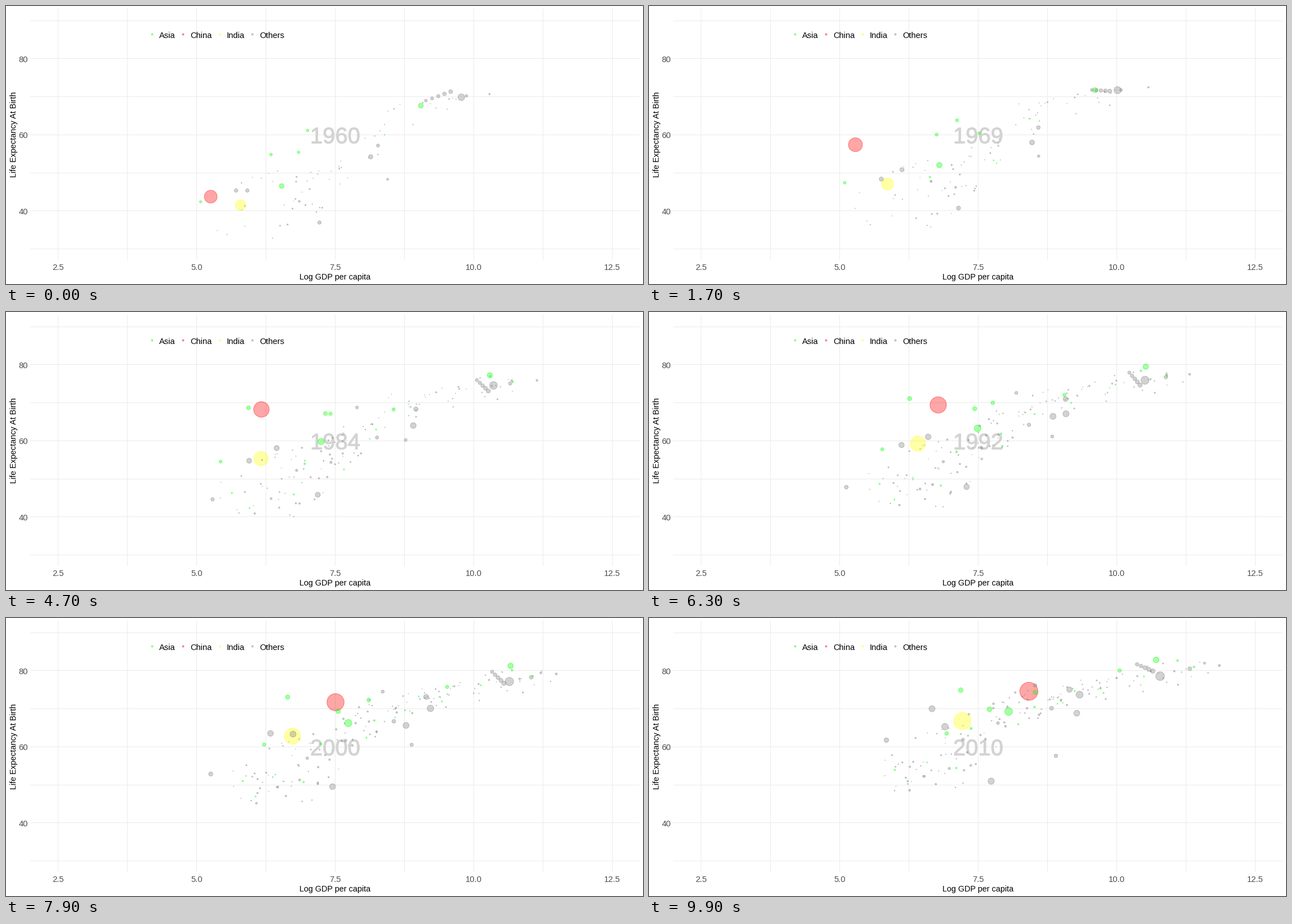
Animation of 1131x495 px, one loop 10 s. Source, as a matplotlib script:

```python
import matplotlib.pyplot as plt
import matplotlib.patheffects as pe
import numpy as np
from matplotlib.animation import FuncAnimation

W, H = 1131, 495
FIRST, LAST = 1960, 2010
YEARS = np.arange(FIRST, LAST + 1)
T = np.linspace(0, 1, len(YEARS))

GREEN, RED, YELLOW, GREY = (0, 1, 0), (1, 0, 0), (1, 1, 0), (0.5, 0.5, 0.5)
FACE_ALPHA, EDGE_ALPHA = 0.35, 0.45

plt.rcParams["font.family"] = ["Liberation Sans", "DejaVu Sans"]

# At 72 dpi one point equals one pixel; the axes use stage pixels.
fig = plt.figure(figsize=((W + 0.01) / 72, (H + 0.01) / 72), dpi=72, facecolor="white")
ax = fig.add_axes([0, 0, 1, 1])
ax.set_xlim(0, W)
ax.set_ylim(H, 0)
ax.axis("off")


def px(gdp):
    return 92.3 + (gdp - 2.5) * 98.4


def py(life):
    return 229.45 - (life - 60) * 6.775


def rgba(colors, alpha):
    colors = np.atleast_2d(colors)
    return np.column_stack([colors, np.full(len(colors), alpha)])


def bubble_radius(people):
    """Radius in pixels for a population in millions."""
    return 0.6 + 13.8 * np.sqrt(people / 1000)


def bubble_area(radius):
    return np.maximum(2 * np.asarray(radius) - 1, 0.8) ** 2


def draw_frame():
    # Lines sit on pixel centres so that they stay one pixel wide.
    grid = dict(color="#EBEBEB", lw=1, snap=False, zorder=1)
    ax.vlines(np.floor(px(np.arange(2.5, 12.6, 1.25))) + 0.5, 5, 452, **grid)
    ax.hlines(np.floor(py(np.arange(30, 91, 10))) + 0.5, 43, 1125, **grid)

    tick = dict(fontsize=14.7, color="#4D4D4D")
    for gdp in np.arange(2.5, 12.6, 2.5):
        ax.text(px(gdp), 470, f"{gdp:.1f}", ha="center", **tick)
    for life in (40, 60, 80):
        ax.text(39, py(life) + 6, str(life), ha="right", **tick)

    title = dict(fontsize=14.4, color="black", ha="center")
    ax.text(584.5, 487, "Log GDP per capita", **title)
    ax.text(18, 229, "Life Expectancy At Birth", rotation=90,
            rotation_mode="anchor", **title)

    legend = [("Asia", GREEN, 258), ("China", RED, 313),
              ("India", YELLOW, 378), ("Others", GREY, 436)]
    for name, color, x in legend:
        ax.scatter([x + 0.5], [50.5], s=bubble_area(2), linewidths=1,
                   facecolors=rgba(color, FACE_ALPHA), edgecolors=rgba(color, EDGE_ALPHA))
        ax.text(x + 13.8, 57, name, fontsize=14.6, color="black")


# Bubbles as (colour, x, y, radius, first year), one value per year.
bubbles = []


def add(color, x, y, people, since=FIRST):
    bubbles.append((color, x, y, bubble_radius(people), since))


def arc(start, middle, end, u):
    """Parabola through three values at u = 0, 0.5 and 1."""
    bend = 2 * (start - 2 * middle + end)
    return start + (end - start - bend) * u + bend * u * u


def track(color, people, start, middle, end, since=FIRST):
    """Add a country whose path runs through three stage points."""
    u = np.clip((YEARS - since) / (LAST - since), 0, 1)
    x, y = (arc(a, b, c, u) for a, b, c in zip(start, middle, end))
    add(color, x, y, people[0] + (people[1] - people[0]) * u, since)


def add_china():
    # The slump after 1960 and the steady climb need a few more key points.
    years = [1960, 1962, 1966, 1968, 1970, 1976, 1984, 1992, 2010]
    x = np.interp(YEARS, years, [363, 327, 366, 352, 380, 395, 453, 513, 674])
    y = np.interp(YEARS, years, [339, 333, 289, 259, 234, 198, 173, 165, 130])
    add(RED, x, y, 667 + 671 * T)


def add_large():
    track(YELLOW, (450, 1205), (416, 354), (455, 257), (556, 183))    # India
    track(GREY, (180, 309), (808, 162), (867, 129), (907, 103))       # United States
    track(GREY, (73, 195), (647, 268), (725, 199), (764, 136))        # Brazil
    track(GREY, (38, 118), (660, 248), (729, 170), (746, 127))        # Mexico
    track(GREY, (45, 159), (556, 385), (554, 323), (607, 290))        # Nigeria
    track(GREY, (46, 173), (428, 328), (482, 239), (525, 193))        # Pakistan
    track(GREY, (49, 151), (408, 328), (433, 261), (502, 161))        # Bangladesh
    track(GREY, (17, 50), (677, 308), (710, 226), (722, 245))         # South Africa
    track(GREEN, (92, 127), (736, 177), (862, 110), (900, 74))        # Japan
    track(GREEN, (88, 241), (489, 320), (562, 227), (638, 166))       # Indonesia
    track(GREEN, (27, 66), (470, 264), (580, 178), (685, 132))        # Thailand
    track(GREEN, (26, 93), (535, 221), (568, 179), (604, 162))        # Philippines
    track(GREEN, (25, 49), (519, 260), (694, 170), (835, 93))         # Korea
    track(GREEN, (21, 50), (345, 348), (384, 263), (528, 205))        # Myanmar
    track(GREEN, (58, 87), (430, 170), (485, 145), (553, 128), 1984)  # Vietnam
    track(GREY, (148, 142), (730, 178), (709, 191), (759, 169), 1989)  # Russia
    track(GREY, (40, 83), (380, 338), (352, 298), (421, 217), 1981)   # Ethiopia


def add_europe():
    """Large western economies climb side by side and bunch up at the end."""
    for i in range(5):
        track(GREY, (30 + 7 * i, 45 + 8 * i), (745 + 11 * i, 168 - 4 * i),
              (838 + 5 * i, 119 + 5 * i), (866 + 7 * i, 82 + 3 * i))


def add_small(count, color, rng, early):
    """Scatter smaller countries along the band that rises over the years."""
    ranks = [0, 0.25, 0.55, 0.8, 1]
    for i in range(count):
        rank = (i + rng.random()) / count
        since = FIRST if rng.random() < early else rng.integers(1961, 1996)
        start = np.interp(rank, ranks, [375, 480, 560, 670, 850])
        end = np.interp(rank, ranks, [425, 540, 690, 810, 1000])
        swing = 7 * np.sin(2 * np.pi * (rng.uniform(0.6, 1.6) * T + rng.random()))
        x = start + (end - start) * T + rng.normal(0, 10) + swing

        # Mean height of the band at both ends, wide at its poor end.
        y_old = np.interp(x, [400, 540, 680, 800, 1000], [372, 330, 200, 162, 135])
        y_new = np.interp(x, [430, 540, 640, 760, 1000], [275, 245, 158, 130, 82])
        spread = np.interp(x, [400, 620, 720], [36, 30, 12])
        y = y_old + (y_new - y_old) * T + spread * np.clip(rng.normal(), -1.6, 2)

        people = min(3.5 * np.exp(rng.normal(0, 1.3)), 60)
        add(color, x, y, people * (0.4 + 0.6 * T), since)


draw_frame()
add_china()
add_large()
add_europe()
rng = np.random.default_rng(12)
add_small(130, GREY, rng, 0.45)
add_small(18, GREEN, rng, 0.2)

# Large bubbles go below the small ones.
bubbles.sort(key=lambda b: -b[3][-1])
colors = np.array([b[0] for b in bubbles], float)
xs, ys, radii = (np.array([b[k] for b in bubbles]) for k in (1, 2, 3))
births = np.array([b[4] for b in bubbles])

label = ax.text(584.5, 244.4, "", fontsize=40, color="#D3D3D3", ha="center", zorder=2)
label.set_path_effects([pe.withStroke(linewidth=1, foreground="#D3D3D3")])
dots = ax.scatter([], [], linewidths=1, zorder=3)


def update(frame):
    # The picture jumps to the next year on every second frame.
    step = (frame + 1) // 2
    year = FIRST + step
    alive = births <= year
    dots.set_offsets(np.column_stack([xs[alive, step], ys[alive, step]]) + 0.5)
    dots.set_sizes(bubble_area(radii[alive, step]))
    dots.set_facecolor(rgba(colors[alive], FACE_ALPHA))
    dots.set_edgecolor(rgba(colors[alive], EDGE_ALPHA))
    label.set_text(str(year))
    return dots, label


anim = FuncAnimation(fig, update, frames=100, interval=100, repeat=True, repeat_delay=0)
plt.show()
```
